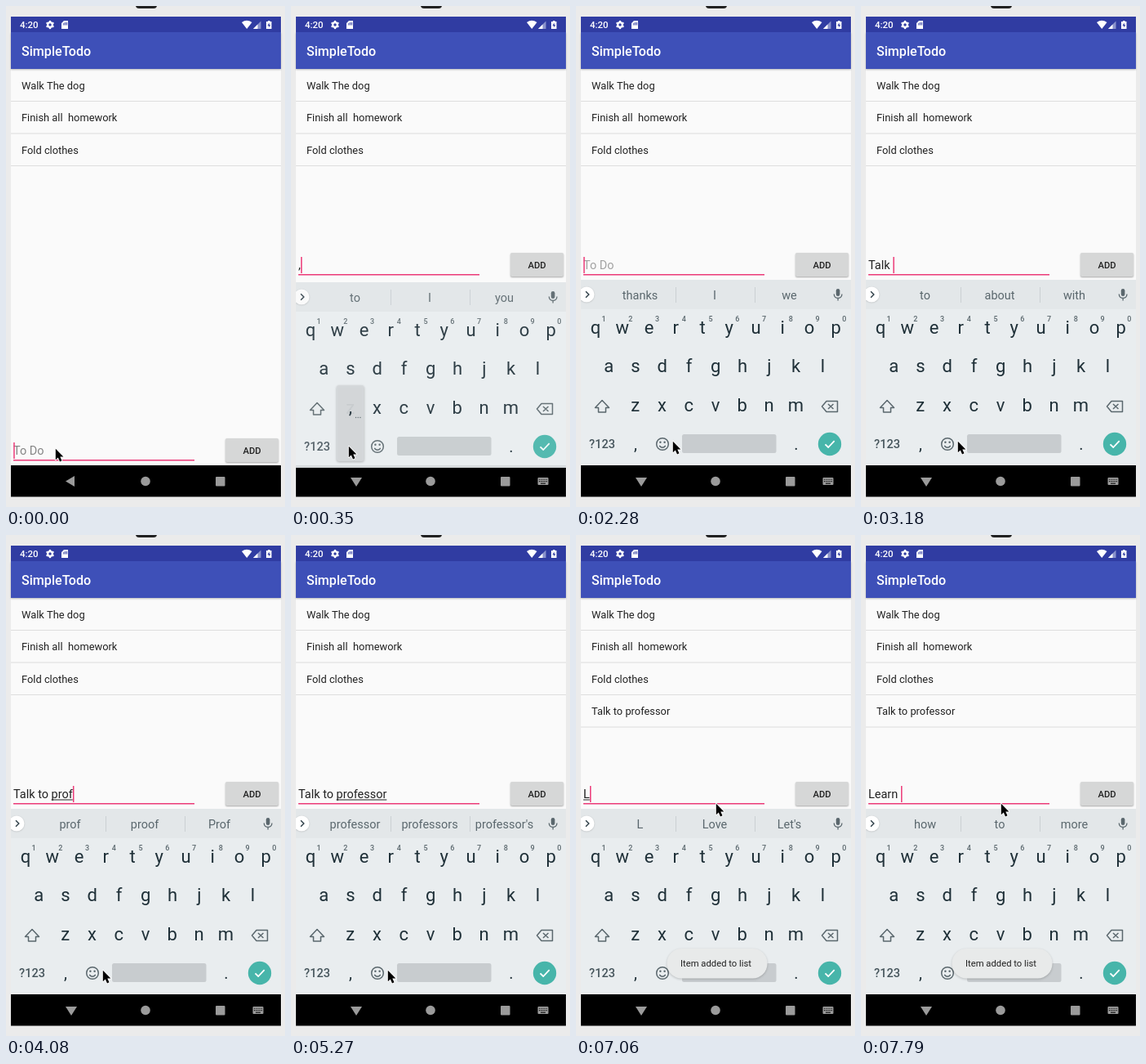
Animation, 342 px wide and 613 px high, one loop 8 s. Source, as an HTML page with a canvas:

```html
<!DOCTYPE html>
<html lang="en">
<head>
<meta charset="utf-8">
<title>Todo list demo</title>
<style>
  html, body { margin: 0; width: 100%; height: 100%; overflow: hidden; background: #ebebeb; }
  canvas { display: block; width: 342px; height: 613px; }
</style>
</head>
<body>
<canvas id="stage"></canvas>
<script>
const LOOP = 8000, W = 342, H = 613;
const canvas = document.getElementById('stage');
const ctx = canvas.getContext('2d');
const scale = window.devicePixelRatio || 1;
canvas.width = W * scale;
canvas.height = H * scale;

const PINK = '#ec3a78', INK = '#212121', KEY = '#1f3038', ICON = '#5a676d';

// Each step changes only the listed properties.
const steps = [
  [0, { text: '', caret: true, hints: '', mouse: [60, 541], items: 3, keyboard: false, drop: 0, toast: 0, ripple: 0 }],
  [350, { keyboard: true, drop: 3, text: ',', hints: 'to I you', mouse: [70, 538] }],
  [500, { drop: 0, mouse: [118, 532] }],
  [790, { caret: false }],
  [1240, { text: '', hints: 'thanks I we', caret: true }],
  [1840, { caret: false }],
  [2280, { caret: true }],
  [2730, { text: 'T', hints: "T The That's" }],
  [3030, { text: 'Tal', hints: 'Tal Talk Tally' }],
  [3180, { text: 'Talk ', hints: 'to about with' }],
  [3480, { text: 'Talk t', hints: 't to the' }],
  [3630, { text: 'Talk to', hints: 'to too told' }],
  [3780, { text: 'Talk to ', hints: 'you the my' }],
  [3930, { text: 'Talk to pr', hints: 'pr pretty people' }],
  [4080, { text: 'Talk to prof', hints: 'prof proof Prof' }],
  [4380, { text: 'Talk to profe', hints: 'profe professor profess' }],
  [4530, { text: 'Talk to profes', hints: 'profes professor profess' }],
  [4680, { text: 'Talk to profess', hints: 'profess professor process' }],
  [4820, { text: 'Talk to professor', hints: "professor professors professor's" }],
  [5270, { caret: false }],
  [5420, { mouse: [150, 436] }],
  [5570, { mouse: [187, 324] }],
  [5870, { mouse: [284, 325], caret: true }],
  [6160, { text: '', hints: '', items: 4, ripple: 1 }],
  [6310, { hints: 'thanks I we', ripple: 0.4, toast: 0.35 }],
  [6460, { ripple: 0, toast: 0.75, mouse: [238, 327] }],
  [6610, { toast: 1, mouse: [171, 328] }],
  [6760, { caret: false }],
  [7060, { text: 'L', hints: "L Love Let's", caret: true }],
  [7210, { text: 'Le', hints: "Le Let Let's" }],
  [7360, { text: 'Lea', hints: 'Lea Leave Lead' }],
  [7510, { text: 'Lear', hints: 'Lear Learn Leary' }],
  [7650, { text: 'Learn', hints: 'Learn Learned Learning' }],
  [7790, { text: 'Learn ', hints: 'how to more' }]
];

function stateAt(time) {
  return Object.assign({}, ...steps.filter(([start]) => start <= time).map(step => step[1]));
}

function rect(x, y, w, h, color, radius = 0) {
  ctx.fillStyle = color;
  ctx.beginPath();
  ctx.roundRect(x, y, w, h, radius);
  ctx.fill();
}

function circle(x, y, r, color) {
  ctx.fillStyle = color;
  ctx.beginPath();
  ctx.arc(x, y, r, 0, 7);
  ctx.fill();
}

function label(text, x, y, size, color, align = 'left', weight = 400) {
  ctx.font = `${weight} ${size}px Roboto, sans-serif`;
  ctx.textAlign = align;
  ctx.fillStyle = color;
  ctx.fillText(text, x, y);
}

function fillPath(d, color, x = 0, y = 0) {
  ctx.save();
  ctx.translate(x, y);
  ctx.fillStyle = color;
  ctx.fill(new Path2D(d), 'evenodd');
  ctx.restore();
}

function strokePath(d, color, width, x = 0, y = 0) {
  ctx.save();
  ctx.translate(x, y);
  ctx.strokeStyle = color;
  ctx.lineWidth = width;
  ctx.lineJoin = 'round';
  ctx.stroke(new Path2D(d));
  ctx.restore();
}

function withShadow(color, blur, offset, draw) {
  ctx.save();
  ctx.shadowColor = color;
  ctx.shadowBlur = blur * scale;
  ctx.shadowOffsetY = offset * scale;
  draw();
  ctx.restore();
}

function drawBars() {
  rect(159, -6, 26, 9, '#222', 4);
  rect(6, 13, 331, 549, '#fafafa');
  withShadow('#0004', 2, 1, () => rect(6, 32, 331, 45, '#3e50b8'));
  rect(6, 13, 331, 19, '#303ca2');
  label('4:20', 17, 27, 11.5, '#fff', 'left', 500);
  label('SimpleTodo', 19, 61, 16.1, '#fff', 'left', 500);

  // Gear, memory card, wifi, signal and battery
  for (let i = 0; i < 6; i++) {
    const a = i * Math.PI / 3 + Math.PI / 6;
    circle(54 + 3.9 * Math.cos(a), 23 + 3.9 * Math.sin(a), 1.3, '#fff');
  }
  circle(54, 23, 4, '#fff');
  circle(54, 23, 1.7, '#303ca2');
  fillPath('M71 18H76V28H68V21Z M70.3 21V23.4H71.2V21Z M72 20V23.4H73V20Z M74 20V23.4H75V20Z', '#fff');
  fillPath('M289 20Q295 15.5 301.5 20L295.2 28Z', '#fff');
  fillPath('M303 28L312.5 18.5V28Z', '#8b93cc');
  fillPath('M303 28L308.5 22.5V28Z', '#fff');
  fillPath('M321 18H323.5V19H325.5V28H319V19H321Z M322.8 20.5L320.5 24H322V26.5L324.2 23H322.8Z', '#fff');
}

function drawList(count) {
  ['Walk The dog', 'Finish all  homework', 'Fold clothes', 'Talk to professor']
    .slice(0, count).forEach((item, i) => {
      label(item, 19, 101.5 + i * 39.5, 12.87, INK);
      rect(6, 116 + i * 39.5, 331, 1, '#dedede');
    });
}

function drawInput(s) {
  ctx.save();
  ctx.translate(0, s.keyboard ? 0 : 227);
  rect(9, 328, 222, 1.5, PINK);
  const size = 14.48;
  if (s.text) {
    label(s.text, 9, 322, size, INK);
  } else {
    label('To Do', 9, 322, size, s.keyboard ? '#a2a2a2' : '#858585');
  }
  ctx.font = `${size}px Roboto, sans-serif`;
  const width = ctx.measureText(s.text).width;
  const word = s.text.match(/[a-z]+$/i);
  if (word) {
    const length = ctx.measureText(word[0]).width;
    rect(9 + width - length, 323.5, length, 1, INK);
  }
  if (s.caret) rect(9.2 + width, 307, 1.5, 20, PINK);

  withShadow('#0005', 2, 1, () => rect(269, 302, 65, 29, '#d6d7d7', 2));
  if (s.ripple) {
    ctx.save();
    ctx.globalAlpha = s.ripple;
    ctx.beginPath();
    ctx.roundRect(269, 302, 65, 29, 2);
    ctx.clip();
    rect(269, 302, 65, 29, '#cbcccc');
    circle(286, 320, 35, '#b8b9b9');
    ctx.restore();
  }
  label('ADD', 301.5, 320.5, 11.26, INK, 'center', 500);
  ctx.restore();
}

function drawNav(keyboard) {
  const color = '#9b9b9b';
  rect(6, 562, 331, 38.5, '#000');
  fillPath(keyboard ? 'M73 577H87L80 588Z' : 'M84 575V588L73 581.5Z', color);
  circle(171, 581.5, 5.8, color);
  rect(257, 576, 11.5, 11.5, color, 1);
  if (!keyboard) return;
  rect(302.5, 577, 13, 9, color, 1);
  for (let row = 0; row < 2; row++) {
    for (let col = 0; col < 5; col++) rect(304 + col * 2.2, 578.7 + row * 2.4, 1.1, 1.1, '#000');
  }
  rect(306, 583.7, 6, 1, '#000');
}

function drawHints(hints) {
  rect(6, 335, 331, 36, '#e3e7e9');
  ctx.save();
  ctx.beginPath();
  ctx.rect(6, 335, 331, 36);
  ctx.clip();
  withShadow('#0003', 2, 0.5, () => circle(13, 353, 9.5, '#fff'));
  ctx.restore();
  strokePath('M12 349.2L15.8 353L12 356.8', '#37474f', 1.6);
  if (hints) {
    hints.split(' ').forEach((word, i) => label(word, 78.5 + i * 91.5, 358.5, 14.48, ICON, 'center'));
    for (const x of [122, 219]) rect(x, 344, 1, 19, '#cbd0d3');
  }
  rect(318.8, 346, 4.6, 9, ICON, 2.3);
  strokePath('M316.3 352.5C316.3 359 326 359 326 352.5M321.1 357.5V360.5', ICON, 1.3);
}

function drawKeyboard(s) {
  ctx.save();
  ctx.translate(0, s.drop);
  if (s.drop) ctx.globalAlpha = 0.92;
  rect(6, 335, 331, 227, '#e9edef');
  drawHints(s.hints);

  const pitch = 32.75;
  [['qwertyuiop', 24, 401], ['asdfghjkl', 40.3, 448.3], ['zxcvbnm', 72.8, 496]].forEach(([row, x, y]) => {
    [...row].forEach((key, i) => label(key, x + i * pitch, y, 22, KEY, 'center'));
  });
  [...'1234567890'].forEach((digit, i) => label(digit, 34 + i * pitch, 386, 9, ICON, 'center', 500));

  label('?123', 32, 541, 14.5, '#46555c', 'center', 500);
  label(',', 73, 542.5, 20, KEY, 'center');
  label('.', 270, 542.5, 20, KEY, 'center');
  rect(130, 524, 115.5, 23, '#c8cccf', 2.5);

  // Shift, backspace, smiley and enter
  strokePath('M0 -7.5L8.5 1.5H4.5V7H-4.5V1.5H-8.5Z', ICON, 1.5, 32, 490);
  strokePath('M-9.5 0L-4 -6.5H9.5V6.5H-4Z M-2 -3L4.5 3M4.5 -3L-2 3', ICON, 1.5, 311, 490);
  strokePath('M7.3 0A7.3 7.3 0 1 1 -7.3 0A7.3 7.3 0 1 1 7.3 0M-3.8 2Q0 6.5 3.8 2', ICON, 1.5, 106, 536);
  circle(103.4, 533.8, 1.2, ICON);
  circle(108.6, 533.8, 1.2, ICON);
  circle(311, 536, 14.2, '#47b5aa');
  strokePath('M-5.5 0.3L-1.7 4L5.7 -3.8', '#fff', 1.8, 311, 536);

  if (s.drop) {
    withShadow('#0004', 3, 1, () => rect(56, 461, 33.5, 93, '#d6dadc', 3));
    label(',', 73, 495, 22, KEY, 'center');
    for (let i = 0; i < 3; i++) circle(79.5 + i * 2.7, 500.5, 0.7, ICON);
  }
  ctx.restore();
}

function drawToast(alpha) {
  ctx.save();
  ctx.globalAlpha = alpha;
  withShadow('#0003', 3, 1, () => rect(111.5, 506, 123, 36.5, '#e8eaea', 18));
  label('Item added to list', 171.5, 528, 11.26, INK, 'center');
  ctx.restore();
}

function drawMouse([x, y]) {
  const arrow = 'M0.8 0.8V14.2L3.8 11.4L6 16.4L8.5 15.3L6.3 10.5H10.4Z';
  strokePath(arrow, '#fff', 1.8, x, y);
  fillPath(arrow, '#000', x, y);
}

function render(now) {
  const s = stateAt(now % LOOP);
  ctx.setTransform(scale, 0, 0, scale, 0, 0);
  rect(0, 0, W, H, '#ebebeb');
  drawBars();
  drawList(s.items);
  drawInput(s);
  drawNav(s.keyboard);
  if (s.keyboard) drawKeyboard(s);
  if (s.toast) drawToast(s.toast);
  drawMouse(s.mouse);
}

const begin = performance.now();
function tick() {
  render(performance.now() - begin);
  requestAnimationFrame(tick);
}
tick();
</script>
</body>
</html>
```
